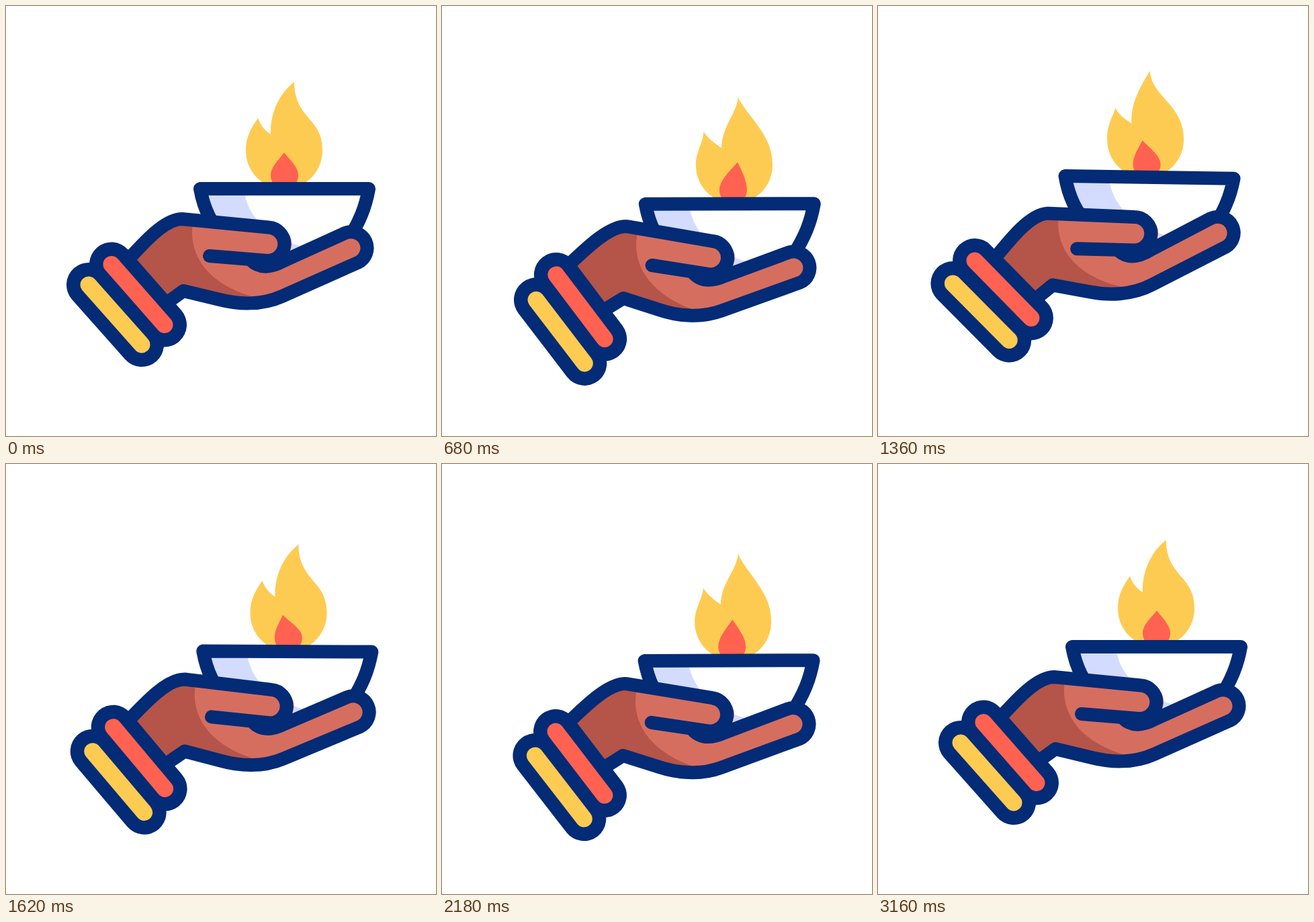
An HTML page for the animation above (3200 ms loop, 640 by 640 pixels).

```html
<!DOCTYPE html>
<html>
<head>
<meta charset="utf-8">
<style>
  html, body { margin: 0; height: 100%; overflow: hidden; background: #fff; }
  svg { display: block; width: 100vw; height: 100vh; }
  .line { fill: none; stroke: #032b76; stroke-width: 20; stroke-linecap: round; stroke-linejoin: round; }
  .cuff { stroke-width: 66; }
  .band { stroke-width: 25; stroke-linecap: round; }
</style>
</head>
<body>
<svg viewBox="0 0 640 640">
  <defs>
    <path id="redLine" d="M157 384.5L236 474.5"/>
    <path id="yellowLine" d="M123 415L202 504"/>
    <path id="bowlShape" d="M289 272H540C535 300 526 322 508 350L420 388L325 345C305 325 294 300 289 272Z"/>
  </defs>
  <path class="flame" fill="#fecb52"/>
  <path class="core" fill="#ff6251"/>
  <g class="bowl">
    <use href="#bowlShape" fill="#fff"/>
    <path fill="#d3dcff" d="M289 272H354C358 315 395 346 440 358L420 388L325 345C305 325 294 300 289 272Z"/>
    <use href="#bowlShape" class="line"/>
  </g>
  <g class="hand">
    <path fill="#d66e5f" d="M176 384C205 352 236 317 262 317L391 329.5A24.5 24.5 0 0 1 408 378L504.2 338.1A24 24 0 0 1 523.8 381.9L411 432C380 446 345 444 318 437L264 424L228 450Z"/>
    <path fill="#b55449" d="M176 384C205 352 236 317 262 317L279 319C270 360 290 412 372 434L345 441L318 437L264 424L228 450Z"/>
    <path class="line" d="M176 384C205 352 236 317 262 317L391 329.5A24.5 24.5 0 0 1 388 379L303 372M364 378Q382 396 412 380L504.2 338.1A24 24 0 0 1 523.8 381.9L411 432C380 446 345 444 318 437L264 424L228 450"/>
  </g>
  <use class="line cuff yellow" href="#yellowLine"/>
  <use class="line cuff red" href="#redLine"/>
  <use class="band yellow" href="#yellowLine" stroke="#fecb52"/>
  <use class="band red" href="#redLine" stroke="#ff6251"/>
</svg>
<script>
const LOOP = 3200, FLICKER = LOOP / 2;
const { PI, sin, cos } = Math;

const ease = f => (1 - cos(PI * f)) / 2;
const mix = (a, b, f) => a + (b - a) * f;

// Each part's pivot, and its shift and turn [x, y, degrees] at both ends of the sway
const parts = {
  hand: { pivot: [400, 345], down: [13.8, 25.8, 5.1], up: [-11, -20.7, -4.1] },
  bowl: { pivot: [414.5, 272], down: [16.8, 27.5, -.25], up: [-13.5, -22, 1] },
  yellow: { pivot: [162.5, 459.5], down: [16.5, 28.8, 5.1], up: [-12, -8, -4.1] },
  red: { pivot: [196.5, 429.5], down: [12, 21.5, 5.1], up: [-13, -11, -4.1] },
  flame: { pivot: [414, 262], down: [25.5, 26.5, 0], up: [-20.5, -21.3, 0] },
  core: { pivot: [414, 262], down: [23, 26.5, 0], up: [-18.5, -21.3, 0] },
};

const sway = [[0, 'rest'], [560, 'down'], [1150, 'up'], [1210, 'up'], [1950, 'down'], [2640, 'rest'], [LOOP, 'rest']];

function placeParts(t) {
  const i = sway.findIndex(([time]) => time > t);
  const [t0, from] = sway[i - 1], [t1, to] = sway[i];
  const f = ease((t - t0) / (t1 - t0));
  for (const name in parts) {
    const part = parts[name], rest = [0, 0, 0];
    const a = part[from] || rest, b = part[to] || rest;
    const [x, y, turn] = a.map((v, k) => mix(v, b[k], f));
    for (const el of document.querySelectorAll('.' + name))
      el.setAttribute('transform', `translate(${x} ${y}) rotate(${turn} ${part.pivot})`);
  }
}

// The flame's tongues above one shared round base
const tongues = (right, left) =>
  `M${right} 471 215C471 247 446 272 414 272C382 272 357 247 357 215C${left}Z`;
const shapes = [
  tongues('429 113C429 142 441 156 455 172C466 185 471 198', '357 195 364 183 375 167C379 178 385 185 394 191C393 160 406 131 429 113'),
  tongues('422 114C426 125 439 141 450 157C463 176 471 192', '357 195 368 183 370 164.5C375 173 384 181 396 189.5C396 158 420 138 422 114'),
  tongues('409 113.5C413 122 427 132 442 149C461 171 471 190', '357 192 364.5 185 362 169.5C366 180 382 184 392.5 191.5C389 160 412 137 409 113.5'),
];

function flamePath(t) {
  const step = t % FLICKER / FLICKER * shapes.length, i = Math.floor(step);
  const next = shapes[(i + 1) % shapes.length].match(/[\d.]+/g);
  let k = 0;
  return shapes[i].replace(/[\d.]+/g, v => mix(+v, +next[k++], ease(step - i)));
}

function corePath(t) {
  const x = 414 + 8 * sin(3 * PI * t / LOOP);
  const y = 218 - 7.5 * sin(PI * t / FLICKER) ** 2;
  const left = mix(x, 394, .42), right = mix(x, 435, .42);
  return `M${x} ${y}C${left} ${y + 12} 394 239 394 252C394 264 403 272 414.5 272C426 272 435 264 435 252C435 239 ${right} ${y + 12} ${x} ${y}Z`;
}

const flame = document.querySelector('.flame'), core = document.querySelector('.core');
const start = performance.now();

(function frame() {
  const t = (performance.now() - start) % LOOP;
  placeParts(t);
  flame.setAttribute('d', flamePath(t));
  core.setAttribute('d', corePath(t));
  requestAnimationFrame(frame);
})();
</script>
</body>
</html>
```
